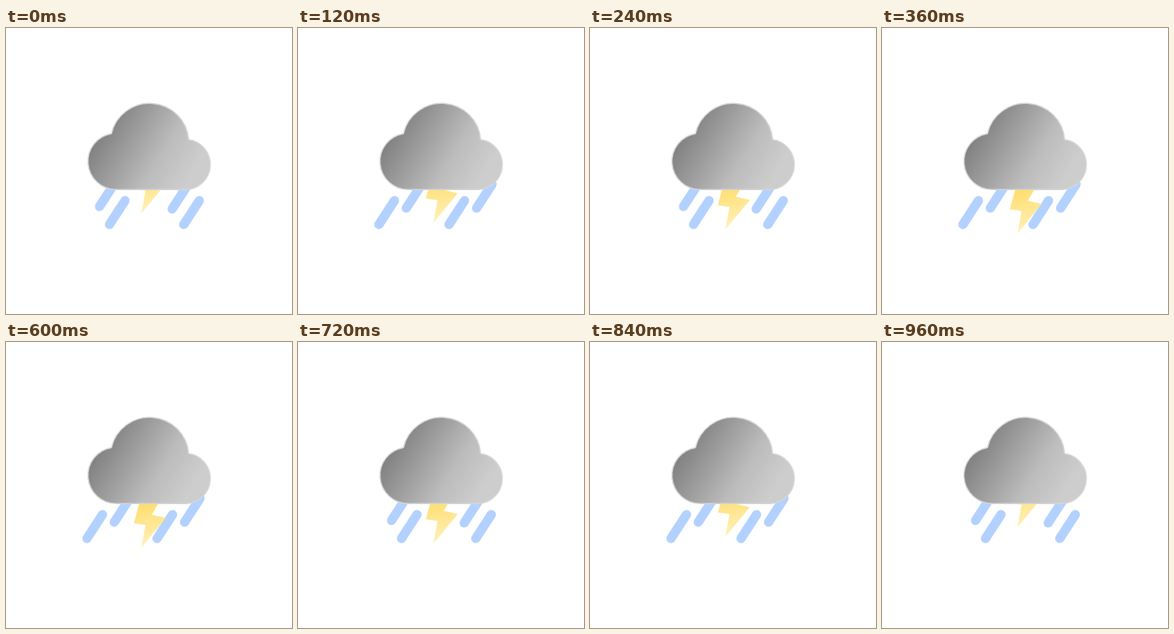
An HTML page for the animation above (1080 ms loop, 358 by 358 pixels).

```html
<!DOCTYPE html>
<html lang="en">
<head>
<meta charset="utf-8">
<title>Thunderstorm</title>
<style>
  html, body { margin: 0; width: 100%; height: 100%; overflow: hidden; background: #fff; }
  svg { display: block; width: 100vw; height: 100vh; }
</style>
</head>
<body>
<svg viewBox="0 0 358 358">
  <defs>
    <linearGradient id="grey" gradientUnits="userSpaceOnUse" x1="122" y1="122" x2="229" y2="188">
      <stop offset="0" stop-color="#808080"/>
      <stop offset=".65" stop-color="#bcbcbc"/>
      <stop offset="1" stop-color="#cdcdcd"/>
    </linearGradient>
    <linearGradient id="gold" gradientUnits="userSpaceOnUse" x1="172" y1="200" x2="182" y2="259">
      <stop offset="0" stop-color="#ffdc68"/>
      <stop offset="1" stop-color="#fff1be"/>
    </linearGradient>
  </defs>
  <path id="rain" fill="none" stroke="#b3d1ff" stroke-width="11.5" stroke-linecap="round"/>
  <path id="bolt" fill="url(#gold)" d="M170.6 190H198.7L182.5 218L200 222L169.5 259L174.7 230.7L160 228.7Z"/>
  <path fill="url(#grey)" stroke="#d6d6d6" stroke-width="1.5"
    d="M138 202.3A35.3 35.3 0 0 1 132 132.2A49 49 0 0 1 228.6 139.8A31.4 31.4 0 0 1 225 202.3Z"/>
</svg>
<script>
const STEP = 120, STEPS = 9, TRAVEL = 27;
const rain = document.getElementById('rain');
const bolt = document.getElementById('bolt');

// Lower end of each drop; all drops share the same slant.
const drops = ends => ends.map(([x, y]) => `M${x} ${y}l19.5 -30`).join('');
const poses = [
  drops([[117, 223.5], [129.5, 246], [208, 226.5], [222.5, 246]]),
  drops([[101.3, 246], [135.5, 225.5], [189, 246], [223.5, 225.5]])
];

function draw(now) {
  const step = Math.floor(now / STEP) % STEPS;
  const lift = -TRAVEL * (1 - step / 4) ** 2;
  rain.setAttribute('d', poses[step % 2]);
  bolt.setAttribute('transform', `translate(0 ${lift.toFixed(2)})`);
}

function tick() {
  draw(performance.now());
  requestAnimationFrame(tick);
}
tick();
</script>
</body>
</html>
```
